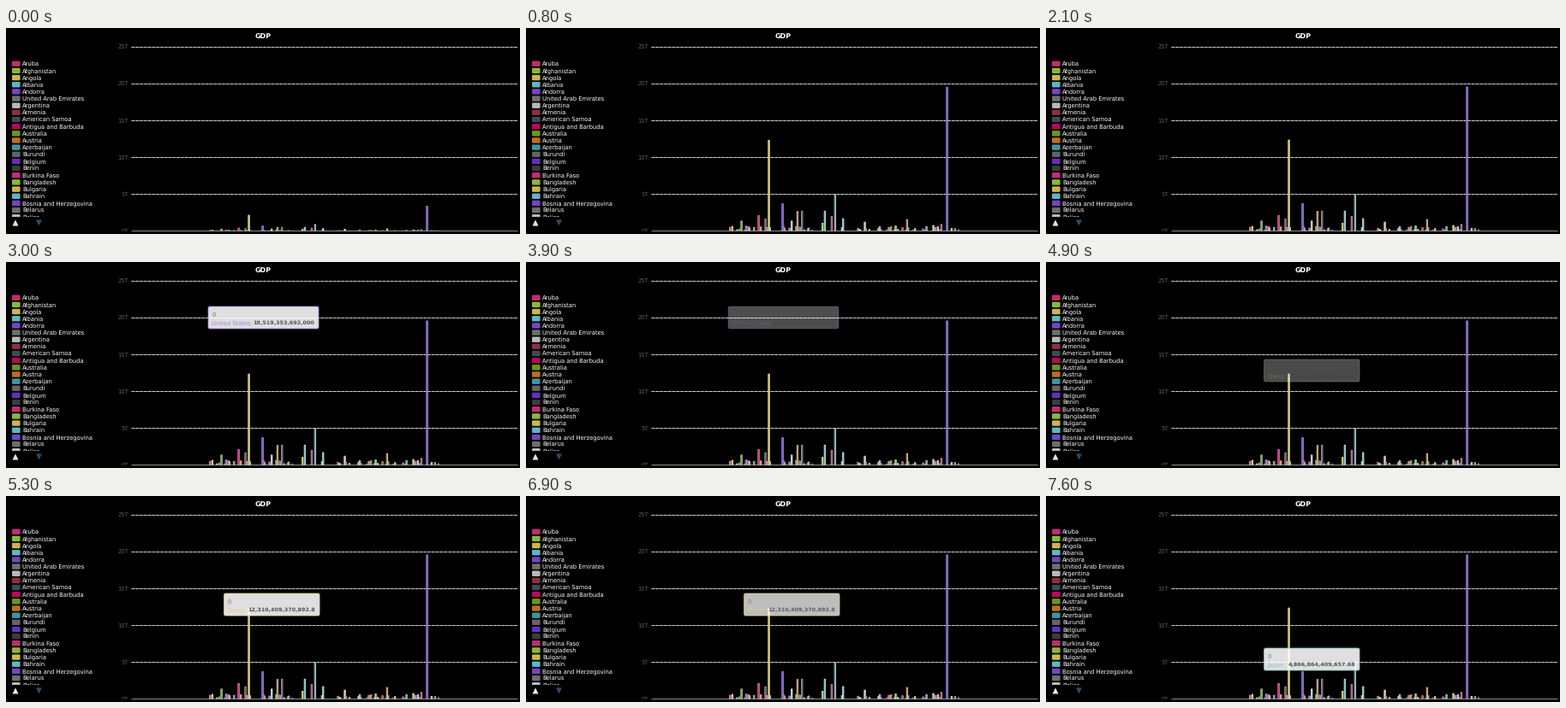
Animation, 600 px wide and 241 px high, one loop 8000 ms. Source, as a matplotlib script:

```python
import matplotlib.pyplot as plt
import numpy as np
from matplotlib.animation import FuncAnimation
from matplotlib.colors import to_rgb
from matplotlib.patches import FancyBboxPatch, Polygon, Rectangle

W, H, DPI = 600, 241, 64
PX = 72 / DPI
STEP, FRAMES = 100, 80
BASE, UNIT = 237, 8.61  # y of zero, pixels per trillion
LEFT, RIGHT = 146, 597
FIRST_BAR, PITCH, BAR_COUNT = 238.2, 4 / 3, 202

PALETTE = ["#bd2e70", "#8cb53f", "#c9b650", "#62b4c6", "#7745bd", "#6e6e70",
           "#b8b8b8", "#8c2f40", "#3c4a59", "#b50a5b", "#6c9616", "#bd6d24",
           "#3f95a0", "#636363", "#6232be", "#3b3b40"]
COUNTRIES = ["Aruba", "Afghanistan", "Angola", "Albania", "Andorra",
             "United Arab Emirates", "Argentina", "Armenia", "American Samoa",
             "Antigua and Barbuda", "Australia", "Austria", "Azerbaijan",
             "Burundi", "Belgium", "Benin", "Burkina Faso", "Bangladesh",
             "Bulgaria", "Bahrain", "Bosnia and Herzegovina", "Belarus", "Belize"]
CHINA, JAPAN, USA = 34, 92, 190
# largest economies in trillions, by position in the country list
LARGEST = {CHINA: 12.31, JAPAN: 4.87, USA: 19.52, 46: 3.65, 83: 2.65, 63: 2.65,
           59: 2.6, 25: 2.05, 89: 1.92, 99: 1.63, 31: 1.6, 155: 1.5, 10: 1.3,
           54: 1.3, 118: 1.15, 81: 1.0, 185: .85}

plt.rcParams["font.family"] = "DejaVu Sans"
plt.rcParams["text.hinting"] = "none"
fig = plt.figure(figsize=(W / DPI, H / DPI), dpi=DPI, facecolor="black")
ax = fig.add_axes([0, 0, 1, 1])
ax.set(xlim=(0, W), ylim=(H, 0))
ax.axis("off")


def color_of(i, white=0.0):
    """Series colour, cycled through the palette and mixed with white."""
    rgb = np.array(to_rgb(PALETTE[i % len(PALETTE)]))
    return tuple(rgb + (1 - rgb) * white)


def label(x, y, s, size=6.75, color="white", **kw):
    return ax.text(x, y, s, fontsize=size * PX, color=color, va="baseline", **kw)


def rounded(x, y, w, h, r, **kw):
    style = f"round,pad=0,rounding_size={r}"
    return ax.add_patch(FancyBboxPatch((x, y), w, h, boxstyle=style, **kw))


def clip_below(y, *artists):
    for artist in artists:
        artist.set_clip_on(True)
        artist.set_clip_path(Rectangle((0, 0), W, y, transform=ax.transData))


def draw_legend():
    for i, name in enumerate(COUNTRIES):
        y = 41.7 + 8.157 * i
        swatch = rounded(7, y - 3.2, 9.6, 6.5, 1.3, fc=color_of(i), ec="none")
        clip_below(221, swatch, label(19.3, y + 2.3, name))
    ax.add_patch(Polygon([(7.5, 231.5), (14.5, 231.5), (11, 224.3)], fc="#e4e4e4", lw=0))
    ax.add_patch(Polygon([(35, 224.3), (42, 224.3), (38.5, 231.5)], fc="#2c4b66", lw=0))


def draw_axis():
    for value in range(0, 26, 5):
        y = BASE - value * UNIT
        clip_below(238, label(143, y + 2.6, f"{value}T", color="#5c5c5c", ha="right"))
        ax.plot([LEFT, RIGHT], [y, y], lw=PX, color="#5a5a5a" if value else "#8a8a8a",
                solid_capstyle="butt", zorder=1)
        if value:
            ax.plot([LEFT, RIGHT], [y, y], color="#cfcfcf", lw=PX, dashes=(3.6, 1.2),
                    dash_capstyle="butt", zorder=1)


def make_bars():
    values = .7 * np.random.default_rng(4).random(BAR_COUNT) ** 8
    values[list(LARGEST)] = list(LARGEST.values())
    bars = []
    for i, value in enumerate(values):
        if value < .1:
            continue
        rect = Rectangle((FIRST_BAR + PITCH * i - .75, BASE), 1.5, 0, fc=color_of(i),
                         ec=color_of(i, .55), lw=.85 * PX, snap=False, zorder=3)
        bars.append((ax.add_patch(rect), value * UNIT))
    return bars


class Tooltip:
    """Translucent box that fades in at show and out at hide (ms)."""

    def __init__(self, x, y, w, i, name, value, show, hide):
        self.times = [show, show + 150, hide, hide + 200]
        self.box = rounded(x, y, w, 26, 2, fc="white", ec=color_of(i, .4),
                           lw=.9 * PX, zorder=5)
        self.texts = [
            label(x + 4.3, y + 11.8, "0", 6.5, "#66666c", zorder=6),
            label(x + 4, y + 21.6, name + ":", color=color_of(i, .35), zorder=6),
            label(x + w - 4.8, y + 21.6, value, 6.35, "#3c3c44", weight="bold",
                  ha="right", zorder=6)]

    def update(self, ms):
        alpha = .88 * np.interp(ms, self.times, [0, 1, 1, 0])
        self.box.set_alpha(alpha)
        for text in self.texts:
            text.set_alpha(alpha)


label(300.3, 12.8, "GDP", 8, weight="bold", ha="center")
draw_legend()
draw_axis()
bars = make_bars()
tooltips = [
    Tooltip(236, 52, 129, USA, "United States", "19,519,353,692,000", 2750, 3770),
    Tooltip(254.5, 114, 111.5, CHINA, "China", "12,310,409,370,892.8", 4850, 6870),
    Tooltip(254.5, 178, 111.5, JAPAN, "Japan", "4,866,864,409,657.68", 7150, 9000)]


def update(frame):
    ms = frame * STEP
    grown = 1 - (1 - min(1, (ms + 60) / 1000)) ** 3  # cubic ease-out
    for rect, full in bars:
        h = full * grown
        rect.set_y(BASE - h)
        rect.set_height(h)
        rect.set_alpha(min(1, h * .7))
    for tip in tooltips:
        tip.update(ms)
    return []


anim = FuncAnimation(fig, update, frames=FRAMES, interval=STEP,
                     repeat=True, repeat_delay=0, blit=False)
plt.show()
```
